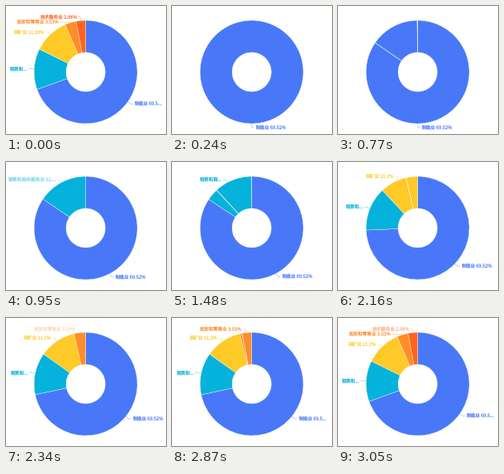
Write a matplotlib script that moves like this. It is 200 px wide and 160 px high and loops after 3550 ms.

```python
import numpy as np
import matplotlib.pyplot as plt
from matplotlib.animation import FuncAnimation
from matplotlib.patches import Wedge

W, H, DPI = 200, 160, 100
PX = 72 / DPI                       # points per pixel
CX, CY, R, HOLE = 99.6, 82.5, 64.5, 24.5
STEP, LOOP, TICK = 30, 3550, 10

VALUES = [69.52, 12.77, 11.20, 3.53, 2.98]
COLORS = ["#4878f8", "#05b2db", "#ffca28", "#ff8d2a", "#ff6420"]
NAMES = ["制造业 69.52%", "租赁和商务服务业 12....", "采矿业 11.2%",
         "批发和零售业 3.53%", "技术服务业 2.98%"]
STARTS = [30, 740, 1450, 2160, 2870]
STEPS = [8, 8, 8, 8, 7]
FADE_END = 0.55                     # label opacity when the slices settle
INK = 0.88                          # opacity of a finished label

plt.rcParams["font.family"] = "Noto Sans CJK JP"
plt.rcParams["font.weight"] = "light"
plt.rcParams["text.hinting"] = "none"


def ease(u):
    return 4 * u ** 3 if u < 0.5 else 1 - (2 - 2 * u) ** 3 / 2


def angles(count):
    """Clockwise slice limits in degrees from the top."""
    shares = np.array(VALUES[:count])
    return np.concatenate([[0], np.cumsum(shares) / shares.sum() * 360])


def leader(count, i):
    """Leader line: rim, elbow and the end next to the label."""
    lim = angles(count)
    a = np.radians((lim[i] + lim[i + 1]) / 2)
    way = np.array([np.sin(a), -np.cos(a)])
    rim = np.array([CX, CY]) + R * way
    elbow = rim + 4.5 * way
    if count == 5 and i == 3:       # pushed away from its neighbour
        elbow = np.array([70.5, 20])
    end = elbow + [2.7 if i == 0 else -2.7, 0]
    return np.array([rim, elbow, end])


def caption(count, i):
    if i == 0 and count == 5:
        return "制造业 69.5..."
    if i == 1 and count > 2:
        return "租赁和商..." if count == 3 else "租赁和..."
    return NAMES[i]


fig = plt.figure(figsize=(W / DPI, H / DPI), dpi=DPI, facecolor="white")
ax = fig.add_axes([0, 0, 1, 1])
ax.set_xlim(0, W)
ax.set_ylim(H, 0)
ax.axis("off")

slices, lines, labels = [], [], []
for i, color in enumerate(COLORS):
    slices.append(ax.add_patch(Wedge(
        (CX, CY), R, 0, 1, width=R - HOLE, fc=color, ec="white",
        lw=0.35 * PX, joinstyle="bevel", snap=False, zorder=2 + i)))
    lines.append(ax.plot([], [], color=color, lw=0.4 * PX, snap=False,
                         zorder=10)[0])
    labels.append(ax.text(0, 0, "", color=color, fontsize=5.8 * PX,
                          ha="left" if i == 0 else "right",
                          va="baseline", zorder=11))


def set_slice(i, start, end, alpha=1):
    # the y axis points down, so the angles run clockwise
    slices[i].set_theta1(start - 90)
    slices[i].set_theta2(max(end, start + 1e-3) - 90)
    slices[i].set_alpha(alpha)
    slices[i].set_visible(alpha > 0)


def set_label(i, pts, text, alpha=1):
    lines[i].set_data(pts[:, 0], pts[:, 1])
    x, y = pts[-1]
    labels[i].set_position((x + (1.8 if i == 0 else -1.8), y + 1.6))
    labels[i].set_text(text)
    for part in (lines[i], labels[i]):
        part.set_alpha(alpha * INK)
        part.set_visible(alpha > 0)


def progress(ms):
    """Number of slices and how far the change to it has come."""
    if ms < STARTS[0]:
        return 5, 1
    k = max(j for j, start in enumerate(STARTS) if ms >= start)
    last = STEPS[k] - 1
    return k + 1, min((ms - STARTS[k]) // STEP, last) / last


def draw(frame):
    ms = frame * TICK
    count, u = progress(ms)
    before = count - 1 if count > 1 else 5
    p = ease(u)
    old, new = angles(before), angles(count)
    for i in range(5):
        if i >= count:              # removed slices fade out
            gone = max(0, 1 - u / 0.4) ** 3 if before > i else 0
            set_slice(i, *(old[i:i + 2] if gone else (0, 1)), gone)
            set_label(i, np.zeros((3, 2)), "", 0)
        elif i >= before:           # a new slice opens from its start
            set_slice(i, new[i], new[i] + (new[i + 1] - new[i]) * p)
            fade = 1 if ms < STARTS[0] else FADE_END * u ** 3
            set_label(i, leader(count, i), caption(count, i), fade)
        else:
            a, b = old[i:i + 2] + (new[i:i + 2] - old[i:i + 2]) * p
            set_slice(i, a, b)
            src, dst = leader(before, i), leader(count, i)
            set_label(i, src + (dst - src) * p, caption(count, i))
    if ms < STARTS[0]:
        labels[2].set_text("采矿业 11.20%")
    return slices + lines + labels


anim = FuncAnimation(fig, draw, frames=LOOP // TICK, interval=TICK,
                     init_func=lambda: draw(0), repeat=True, repeat_delay=0,
                     blit=False)
plt.show()
```
